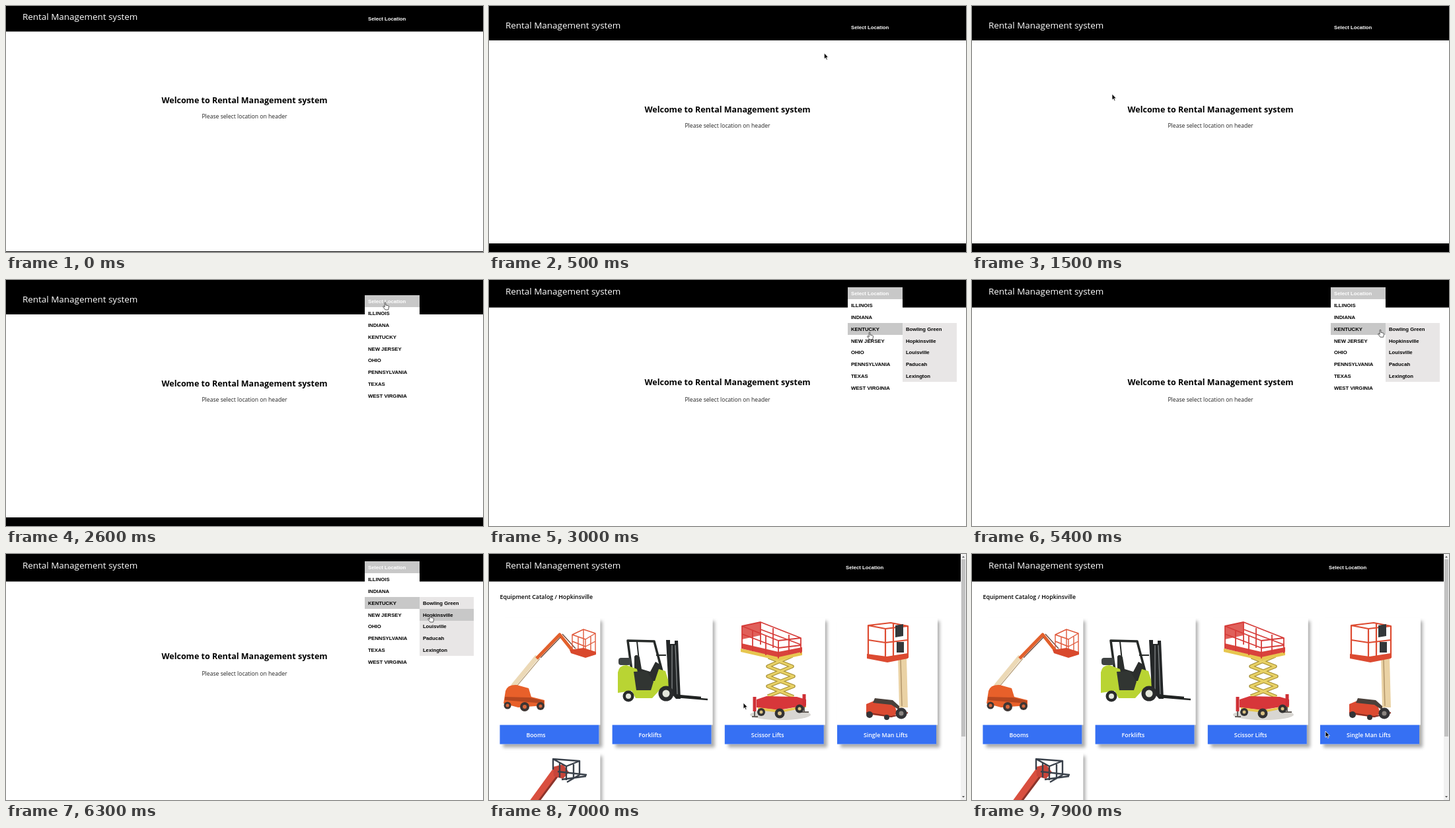
An HTML page for the animation above (8 s loop, 722x372 px).

```html
<!DOCTYPE html>
<html lang="en">
<meta charset="utf-8">
<title>Rental Management system</title>
<style>
html, body { margin: 0; width: 100%; height: 100%; overflow: hidden; background: #fff }
svg { display: block }
text { font: 8.65px "Open Sans", "Noto Sans", sans-serif }
.bold { font-weight: 600; font-size: 8.8px }
.menu { font: bold 7.75px "Liberation Sans", Arial, sans-serif }
.mid { text-anchor: middle }
.card { fill: #fff; filter: drop-shadow(5px 5px 2.5px #0005) }
.line { fill: none; stroke-linejoin: round }
#list rect { shape-rendering: crispEdges }
</style>
<svg width="722" height="372" viewBox="0 0 722 372">
  <g id="home">
    <text id="welcome" class="mid" x="361" style="font-size:12.5px;font-weight:700">Welcome to Rental Management system</text>
    <text id="hint" class="mid" x="361" fill="#222">Please select location on header</text>
    <rect id="footer" width="722" height="20"/>
  </g>
  <g id="catalog">
    <text class="bold" x="16.5" y="68.4">Equipment Catalog / Hopkinsville</text>
    <g id="cards"></g>

    <g id="boom">
      <path class="line" stroke="#ecd9b6" stroke-width="7" d="M36 200L73 155"/>
      <path class="line" stroke="#b9a17c" stroke-width="1.2" d="M41 201L77 158"/>
      <path class="line" stroke="#e2602c" stroke-width="5" d="M72 158L107 122L127 147"/>
      <path class="line" stroke="#6b4a3c" stroke-width="1.3" d="M78 157L108 126M111 121L131 143"/>
      <path fill="#e8602a" d="M25 207Q28 197 42 198L60 203L64 216L84 221V229L44 232L22 226Z"/>
      <path fill="#b54720" d="M24 216L62 217L83 222V226L24 221Z"/>
      <g fill="#3d3634"><circle cx="28" cy="229" r="5.5"/><circle cx="54" cy="231" r="7"/><circle cx="78" cy="230" r="6"/></g>
      <g fill="#d8673c"><circle cx="28" cy="229" r="2.5"/><circle cx="54" cy="231" r="3"/><circle cx="78" cy="230" r="2.5"/></g>
      <path class="line" stroke="#e0583a" stroke-width="1.4" d="M126 143V122L143 114L161 120V150M126 122L146 129L161 120M126 132L146 140L161 132M146 129V155M143 114V146M135 126V149M154 125V152"/>
      <path fill="#d9482c" d="M122 145L143 142L162 148V152L146 157L124 150Z"/>
    </g>

    <g id="forklift">
      <path class="line" stroke="#262a28" stroke-width="3.5" d="M216 176L210 131L250 132L263 181"/>
      <path class="line" stroke="#262a28" stroke-width="2" d="M228 171L224 132M253 153H268"/>
      <rect x="196" y="157" width="19" height="11" rx="4" fill="#3f4343"/>
      <path fill="#2b2e2d" d="M220 177V155Q223 150 228 156L231 174L244 178L252 163L259 167L263 193H222Z"/>
      <path fill="#b9d433" d="M195 179Q197 168 208 168L224 174L228 192H251L257 174L267 177L276 206H258L247 218H222L216 207L195 210Z"/>
      <path fill="#313532" d="M219 178L239 177L249 193L245 206H223Z"/>
      <path fill="#242728" d="M268 130H274V136H281V131H286L290 219H283L272 206Z"/>
      <path class="line" stroke="#8b9091" stroke-width="1.2" d="M277 138V208M282 138L285 212"/>
      <path class="line" stroke="#202322" stroke-width="2.5" d="M283 216L331 220M287 214L321 217"/>
      <g fill="#292b2c"><circle cx="211" cy="215" r="8.5"/><circle cx="268" cy="211" r="11.5"/></g>
      <g fill="#e4e7dc"><circle cx="211" cy="215" r="4"/><circle cx="268" cy="211" r="5.5"/></g>
    </g>

    <g id="scissor">
      <ellipse cx="441" cy="243" rx="46" ry="8" fill="#d8d6d2"/>
      <path class="line" stroke="#a68f35" stroke-width="5.5" d="M423 156L459 170L422 185L461 200L422 215M459 154L422 170L461 185L422 200L461 216"/>
      <path class="line" stroke="#e8d165" stroke-width="3" d="M423 156L459 170L422 185L461 200L422 215M459 154L422 170L461 185L422 200L461 216"/>
      <path fill="#e7c64f" d="M381 143L438 155L474 148V153L438 161L381 148Z"/>
      <path fill="#d9423c" d="M382 135L438 148L474 141V148L438 156L382 143Z"/>
      <path fill="#e0605a" d="M383 109L411 103V123L383 129Z"/>
      <path class="line" stroke="#d63c39" stroke-width="1.8" d="M383 143V109L411 103L472 127V150M383 109L438 131L472 127M383 121L438 142L472 138M438 131V158M411 103V137M399 116V147M419 124V153M454 122V151M430 112V142M411 114L472 137"/>
      <path fill="#d7363a" d="M405 220L420 215L466 216L480 220V229L438 236L405 232Z"/>
      <path fill="#e7c64f" d="M407 232L441 236L480 229V232L441 240L407 236Z"/>
      <path class="line" stroke="#cf3036" stroke-width="5" d="M402 216V238M477 212V231"/>
      <path class="line" stroke="#66605b" stroke-width="2" d="M402 238V246M398 246H407M477 231V239M472 239H484"/>
      <g fill="#333"><circle cx="412" cy="239" r="6"/><circle cx="440" cy="241" r="7.5"/><circle cx="470" cy="234" r="6.5"/></g>
      <g fill="#d9c183"><circle cx="412" cy="239" r="2.5"/><circle cx="440" cy="241" r="3"/><circle cx="470" cy="234" r="2.5"/></g>
    </g>

    <g id="manlift">
      <path fill="#ead2a4" d="M619 156H632L634 232H621Z"/>
      <path class="line" stroke="#b3966a" stroke-width="1.5" d="M623 160L625 230"/>
      <path class="line" stroke="#dd4b31" stroke-width="2.2" d="M574 155V108L608 104L634 109V157M574 108L600 113L634 109M574 130L600 134L634 130M600 113V160M612 105V154"/>
      <path fill="#dc4a31" d="M572 151L602 155L634 150V158L603 164L572 158Z"/>
      <path fill="#33383a" d="M615 108L627 106V124L615 126ZM617 133H628V149H617Z"/>
      <path fill="#dc4a31" d="M571 227L583 222L613 226L618 241L609 247L571 242Z"/>
      <path fill="#4a403a" d="M584 218L611 221L621 230V236L609 228L581 225Z"/>
      <path class="line" stroke="#8c2f24" stroke-width="2" d="M571 240L609 246L634 240"/>
      <g fill="#343437"><circle cx="624" cy="241" r="8.5"/><circle cx="576" cy="243" r="5"/><circle cx="602" cy="247" r="4"/></g>
      <circle cx="624" cy="241" r="3.5" fill="#8a8480"/>
    </g>

    <g id="handler">
      <path class="line" stroke="#d94f3f" stroke-width="12" d="M64 380L104 325"/>
      <path class="line" stroke="#8d342b" stroke-width="3" d="M69 382L108 330"/>
      <path fill="#c8453a" d="M97 322L112 318L121 330L112 340L98 336Z"/>
      <path class="line" stroke="#39404a" stroke-width="2.4" d="M97 326V310L137 313V334L118 345M97 310L117 321L137 313M104 329L148 334M110 341L147 336M117 321V342M128 318V339M107 316V338"/>
    </g>

    <rect x="714" width="8" height="372" fill="#f1f1f1"/>
    <rect x="715" y="8" width="6" height="268" fill="#c1c1c1"/>
    <path fill="#555" d="M716 5.5L718 3L720 5.5ZM716 366L718 368.5L720 366Z"/>
  </g>

  <rect id="header"/>
  <text id="title" x="25" fill="#fff" style="font-size:13.45px">Rental Management system</text>
  <g id="menu">
    <g id="list"></g>
    <text class="menu" x="548" y="22.9" fill="#fff">Select Location</text>
  </g>
  <path id="arrow" d="M0 0V9.2L2.1 7.3L3.5 10.4L5 9.7L3.6 6.8H6.4Z" stroke="#fff" stroke-width=".8"/>
  <path id="hand" d="M-.8 .4Q0 -.8 .9 .4V4L4.7 4.9Q5.7 5.4 5.5 7L4.7 11H0L-3.3 6.6Q-3.3 5.2 -2 5.7L-.8 7Z" fill="#fff" stroke="#333" stroke-width=".8"/>
</svg>
<script>
const $ = id => document.getElementById(id);
const set = (el, attrs) => { for (const k in attrs) el.setAttribute(k, attrs[k]); return el; };
const show = (el, on) => { el.style.display = on ? '' : 'none'; };
function add(parent, tag, attrs, content = '') {
  const el = parent.appendChild(document.createElementNS('http://www.w3.org/2000/svg', tag));
  el.textContent = content;
  return set(el, attrs);
}

// Equipment cards
['Booms', 'Forklifts', 'Scissor Lifts', 'Single Man Lifts', ''].forEach((name, i) => {
  const x = 16.4 + i % 4 * 170.2, y = i < 4 ? 96.5 : 300.5;
  add($('cards'), 'rect', { class: 'card', x, y, width: 150, height: 191 });
  add($('cards'), 'rect', { x, y, width: 152, height: 162, fill: '#fff' });
  add($('cards'), 'rect', { x, y: y + 162, width: 150, height: 29, fill: '#3670f3' });
  add($('cards'), 'text', { class: 'bold', x: x + 40, y: y + 180.3, fill: '#fff' }, name);
});

// Location menu
const ROW = 17.9, LEFT = 542.5, SPLIT = 625.5, RIGHT = 708, TOP = 11.2;
const GREY = '#c8c8c8';
const states = [
  ['ILLINOIS', 'Mt Vernon'], ['INDIANA', 'Evansville'],
  ['KENTUCKY', 'Bowling Green', 'Hopkinsville', 'Louisville', 'Paducah', 'Lexington'],
  ['NEW JERSEY', 'Trenton'], ['OHIO', 'Cincinnati'], ['PENNSYLVANIA', 'Pittsburgh'],
  ['TEXAS', 'Houston'], ['WEST VIRGINIA', 'Charleston']
];
const KENTUCKY = 2;
function cell(parent, x, row, label, fill) {
  const y = TOP + row * ROW;
  const box = add(parent, 'rect', { x, y, width: x === LEFT ? SPLIT - LEFT : RIGHT - SPLIT, height: ROW, fill });
  add(parent, 'text', { class: 'menu', x: x + 5.4, y: y + 11.7 }, label);
  return box;
}
cell($('list'), LEFT, 0, '', GREY);
const rows = states.map(([state, ...cities], i) => {
  const box = cell($('list'), LEFT, i + 1, state, '#fff');
  const sub = add($('list'), 'g', {});
  return { box, sub, cities: cities.map((city, j) => cell(sub, SPLIT, i + 1 + j, city, '#e8e6e6')) };
});

// Pointer path: time, x, y
const path = [
  [100, 510, 264], [400, 500, 72], [700, 522, 69], [900, 532, 40], [1200, 420, 90], [1500, 212, 133],
  [1800, 352, 188], [2000, 390, 243], [2200, 442, 196], [2500, 568, 62], [2600, 574, 34], [2700, 577, 45],
  [2800, 577, 45], [3000, 576, 79], [3300, 577, 163], [3400, 577, 163], [3900, 577, 76], [4300, 577, 76],
  [4400, 577, 53], [4700, 577, 42], [5100, 590, 74], [5200, 590, 74], [5500, 632, 76], [5800, 648, 107],
  [6100, 642, 92], [6500, 642, 92], [7000, 385, 225], [7400, 330, 312], [7600, 410, 298], [7900, 535, 268]
];
function pointer(t) {
  const i = Math.max(1, path.findIndex(p => p[0] >= t));
  const [t0, x0, y0] = path[i - 1], [t1, x1, y1] = path[i];
  const k = (t - t0) / (t1 - t0);
  return [x0 + (x1 - x0) * k, y0 + (y1 - y0) * k];
}

// Layout of the page while the window changes size
const layouts = [
  { header: 38.6, title: 21, welcome: 147, hint: 170, footer: 371, menu: -1.3 },
  { header: 52, title: 34, welcome: 160.5, hint: 184, footer: 359, menu: 12 },
  { header: 41.6, title: 22.4, welcome: 158.5, hint: 184, footer: 372, menu: 0 }
];

function draw(t) {
  const catalog = t >= 6400, open = t >= 2600 && !catalog;
  const page = layouts[t < 100 ? 0 : t < 2800 ? 1 : 2];
  const [x, y] = pointer(Math.max(t, 100));

  show($('home'), !catalog);
  show($('catalog'), catalog);
  set($('header'), { width: catalog ? 714 : 722, height: page.header });
  for (const id of ['title', 'welcome', 'hint', 'footer']) set($(id), { y: page[id] });

  set($('menu'), { transform: `translate(${catalog ? -8 : 0} ${page.menu})` });
  show($('list'), open);
  const line = Math.floor((y - page.menu - TOP) / ROW) - 1;
  const inSub = x > SPLIT, active = inSub ? KENTUCKY : line;
  rows.forEach(({ box, sub, cities }, i) => {
    set(box, { fill: i === active ? GREY : '#fff' });
    show(sub, i === active);
    cities.forEach((c, j) => set(c, { fill: inSub && i + j === line ? GREY : '#e8e6e6' }));
  });

  show($('hand'), open);
  show($('arrow'), !open && t >= 100);
  for (const id of ['hand', 'arrow']) set($(id), { transform: `translate(${x} ${y})` });
}

function tick() {
  draw(Math.floor(performance.now() % 8000 / 100) * 100);
  requestAnimationFrame(tick);
}
tick();
</script>
</html>
```
